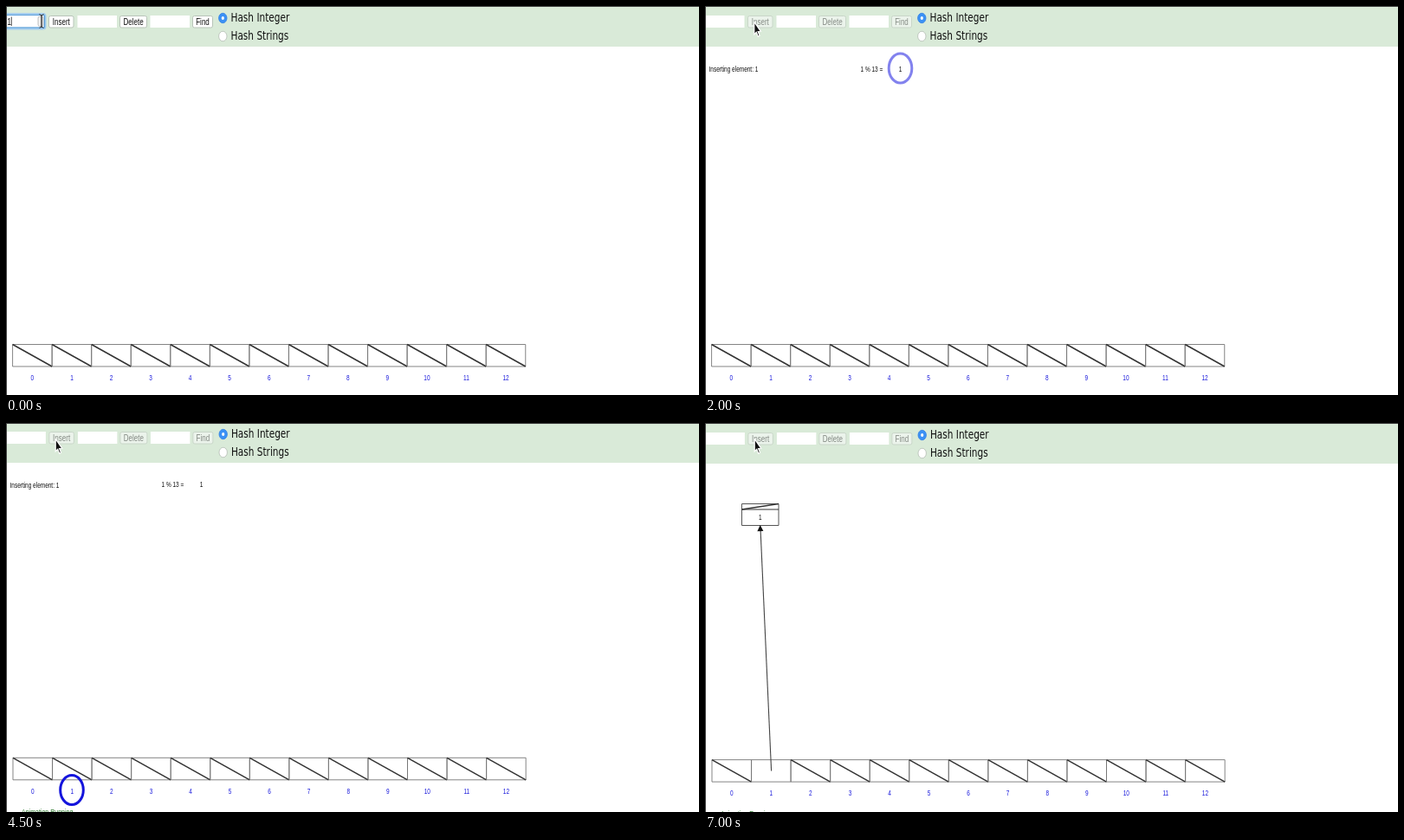
These frames come from a looping animation (800 px wide and 450 px high, 8 s). An HTML page with a canvas:

```html
<!DOCTYPE html>
<html lang="en">
<head>
<meta charset="utf-8">
<title>Open hashing: insert 1</title>
<style>
  html, body { margin: 0; width: 100%; height: 100%; overflow: hidden; background: #fff; }
  canvas { display: block; }
</style>
</head>
<body>
<canvas id="stage" width="800" height="450"></canvas>
<script>
const ctx = document.getElementById('stage').getContext('2d');
const ARIAL = '"Liberation Sans", Arial, sans-serif';
const VERDANA = '"DejaVu Sans", Verdana, sans-serif';
const ASPECT = 0.78; // the whole screen is narrowed
const LOOP = 8000;
const CELLS = 13, CELL_W = 45.55, CELL_H = 25.5;

// dx, dy: toolbar drift; table: top edge of the hash table
const steps = [
  { start: 0, dx: 0, dy: 0, table: 391.5, typing: true },
  { start: 500, dx: 0, dy: 0, table: 391.5, message: 76, ring: [225.5, 72, '#8282ee'] },
  { start: 3000, dx: 0.4, dy: -1, table: 387.3, message: 74.7, ring: [76, 424.5, '#1414dc'] },
  { start: 5500, dx: 0.4, dy: 0, table: 389.6, node: true }
];

function text(str, x, y, size, color = '#111', align = 'left', font = ARIAL) {
  ctx.save();
  ctx.translate(x, y);
  ctx.scale(ASPECT, 1);
  ctx.font = `${size}px ${font}`;
  ctx.fillStyle = color;
  ctx.textAlign = align;
  ctx.fillText(str, 0, 0);
  ctx.restore();
}

function path(points, stroke, width = 1, fill) {
  ctx.beginPath();
  points.forEach(([x, y]) => ctx.lineTo(x, y));
  paint(stroke, width, fill);
}

function ellipse(x, y, rx, ry, stroke, width, fill) {
  ctx.beginPath();
  ctx.ellipse(x, y, rx, ry, 0, 0, Math.PI * 2);
  paint(stroke, width, fill);
}

function box(x, y, w, h, stroke, width, fill, radius = 0) {
  ctx.beginPath();
  ctx.roundRect(x, y, w, h, radius);
  paint(stroke, width, fill);
}

function paint(stroke, width, fill) {
  if (fill) { ctx.fillStyle = fill; ctx.fill(); }
  if (stroke) { ctx.strokeStyle = stroke; ctx.lineWidth = width; ctx.stroke(); }
}

function button(label, x, w, enabled) {
  box(x, 11.5, w, 13.5, enabled ? '#b9c4b9' : '#c9d6c9', 1, enabled ? '#fff' : '#ebf3eb', 2);
  text(label, x + w / 2, 21.5, 10.3, enabled ? '#111' : '#858b85', 'center');
}

function radio(label, y, checked) {
  ellipse(250.3, y + 1, 4.7, 5.7, checked ? '#2f80e4' : '#b4bdb4', 0.8, checked ? '#3c91f5' : '#fff');
  if (checked) ellipse(250.3, y + 1, 1.6, 2, null, 0, '#fff');
  text(label, 259.5, y + 4.5, 13.5, '#111', 'left', VERDANA);
}

function typingField() {
  box(-2, 9.5, 47, 16.5, '#a5cdee', 3, '#fff', 2);
  box(-1, 10.5, 45.5, 14.5, '#5b9fda', 1.2, null, 1);
  text('1', 1.5, 21.5, 10.3);
  path([[6.3, 12.5], [6.3, 23]], '#222', 0.8);
  box(37, 12, 6, 11.5, '#b5b5b5', 0.8, '#eee', 2);
  path([[38.5, 9.5], [41, 11], [43.5, 9.5]], '#333');
  path([[41, 10.5], [41, 24.5]], '#333', 1.4);
  path([[38.5, 25.5], [41, 24], [43.5, 25.5]], '#333');
}

function pointer(x, y) {
  const outline = [[0, 0], [0, 14.5], [2.5, 12], [4.5, 17], [6.3, 16], [4.4, 11.2], [7.6, 11], [0, 0]];
  path(outline.map(([px, py]) => [x + px, y + py]), '#fff', 1.2, '#111');
}

function toolbar({ dx, dy, typing }) {
  ctx.fillStyle = '#d9ead8';
  ctx.fillRect(0, 0, 800, 47 + dy);
  ctx.save();
  ctx.translate(dx, dy);
  ctx.fillStyle = '#fff';
  for (const x of [0, 82.5, 166.5]) ctx.fillRect(x, 11, 45.5, 14);
  button('Insert', 49.5, 28.5, typing);
  button('Delete', 131.5, 31, typing);
  button('Find', 215.5, 23, typing);
  radio('Hash Integer', 13, true);
  radio('Hash Strings', 34, false);
  if (typing) typingField();
  ctx.restore();
  if (!typing) pointer(56.8 + dx, 18.3);
}

function table({ table: top, dx, node }) {
  for (let i = 0; i < CELLS; i++) {
    const x = 7.6 + dx + i * CELL_W;
    box(x, top, CELL_W, CELL_H, '#777', 0.9);
    if (!(node && i === 1)) path([[x, top], [x + CELL_W, top + CELL_H]], '#333', 1.5);
    text(i, x + CELL_W / 2, top + 41.3, 8.3, '#1c1cdc', 'center');
  }
  text('Animation Running', 18, top + 65.7, 9, '#2c7a2c');
}

function listNode() {
  box(42.5, 93.5, 42.5, 25, '#555', 1, '#fff');
  path([[42.5, 100], [85, 100]], '#333', 1.1);
  path([[42.5, 100], [85, 93.5]], '#333', 1.3);
  text('1', 63.7, 112.3, 8.3, '#111', 'center');
  path([[76.6, 402.5], [64, 122]], '#444', 1.1);
  path([[63.7, 118], [60.4, 125.3], [67.4, 125]], null, 0, '#111');
}

function draw(now) {
  const time = now % LOOP;
  const step = steps.findLast(s => s.start <= time);
  ctx.fillStyle = '#fff';
  ctx.fillRect(0, 0, 800, 450);
  toolbar(step);
  table(step);
  if (step.message) {
    text('Inserting element: 1', 4.5, step.message, 8.3);
    text('1 % 13 =', 179.5, step.message - 0.5, 8.3);
    text('1', 225.6, step.message - 0.5, 8.3, '#111', 'center');
  }
  if (step.ring) {
    const [x, y, color] = step.ring;
    ellipse(x, y, 13.3, 17, color, 3);
  }
  if (step.node) listNode();
  ctx.fillStyle = '#3c3c3c';
  ctx.fillRect(0, 0, 800, 1);
  ctx.fillRect(0, 0, 1, 450);
}

const began = performance.now();
function tick() {
  draw(performance.now() - began);
  requestAnimationFrame(tick);
}
tick();
</script>
</body>
</html>
```
